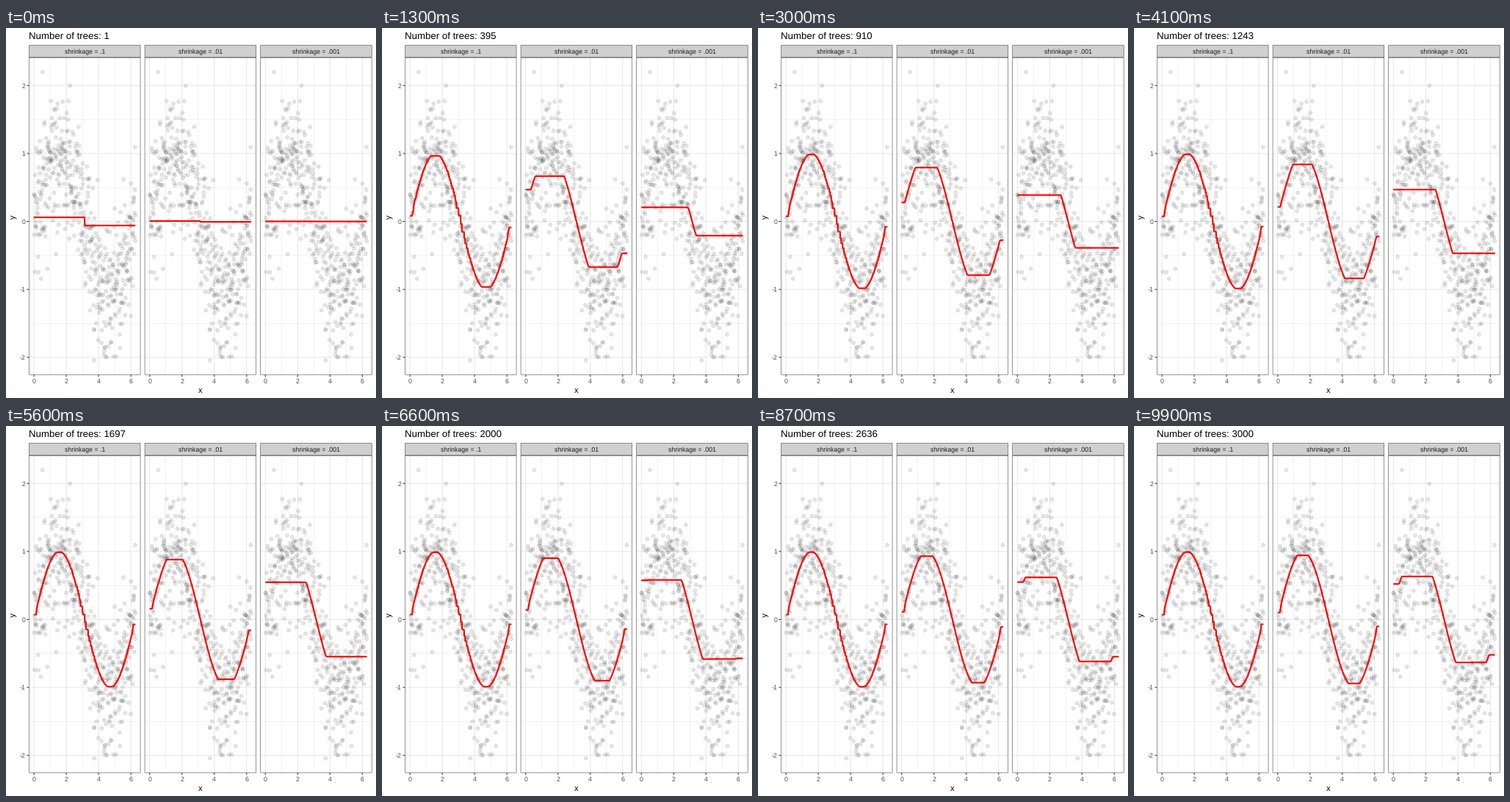
A matplotlib script that plays this animation: 504x504 px, repeating every 10000 ms.

```python
import math
import random

import matplotlib.pyplot as plt
import numpy as np
from matplotlib.animation import FuncAnimation
from matplotlib.patches import Rectangle

SIZE, DPI = 504, 72
FRAMES, INTERVAL = 100, 100
N, TREES, MIN_LEAF = 500, 3000, 10

LEFTS, WIDTH = (31.2, 188.8, 346.4), 152.1
STRIP_TOP, TOP, BOTTOM = 23.3, 40.2, 472.4
RATES = {".1": 0.1, ".01": 0.01, ".001": 0.001}

plt.rcParams["font.family"] = "Liberation Sans"
plt.rcParams["path.snap"] = False
plt.rcParams["text.hinting"] = "none"

GRID, DARK, LABEL, STRIP = "#e8e8e8", "#333333", "#4d4d4d", "#d0d0d0"
THIN, THICK = 0.53, 1.07


def to_px(left, x):
    return left + 6.9 + 22.0 * x


def to_py(y):
    return 263.5 - 92.55 * y


def seed_like_r(seed):
    """Seed the Mersenne Twister the way R's set.seed does."""
    key = []
    for i in range(675):
        seed = (69069 * seed + 1) % 2**32
        if i > 50:
            key.append(seed)
    random.setstate((3, tuple(key) + (624,), None))


def unif():
    return random.getrandbits(32) / 2**32


def normal_draws(count):
    """Normal deviates by inversion."""
    big = 2**27
    p = [(int(big * unif()) + unif()) / big for _ in range(count)]
    z = np.linspace(-5, 5, 20001)
    cdf = [0.5 * (1 + math.erf(v / math.sqrt(2))) for v in z]
    return np.interp(p, cdf, z)


def draw_bag():
    """Half of the indices, in order, without replacement."""
    bag, need = [], N // 2
    for i in range(N):
        if unif() * (N - i) < need:
            bag.append(i)
            need -= 1
            if not need:
                break
    return np.array(bag)


def boost(target, rate, counts):
    """Stochastic boosting with stumps; the fit after each tree count."""
    fit = np.zeros(N)
    half = N // 2
    cuts = np.arange(MIN_LEAF, half - MIN_LEAF + 1)
    wanted, fits = set(counts), {}
    for tree in range(1, TREES + 1):
        bag = draw_bag()
        sums = np.cumsum((target - fit)[bag])
        low = sums[cuts - 1]
        high = sums[-1] - low
        best = np.argmax((low / cuts - high / (half - cuts))**2
                         * cuts * (half - cuts))
        cut = cuts[best]
        edge = (bag[cut - 1] + bag[cut] + 1) // 2
        fit[:edge] += rate * low[best] / cut
        fit[edge:] += rate * high[best] / (half - cut)
        if tree in wanted:
            fits[tree] = fit.copy()
    return fits


seed_like_r(1112)
grid = np.linspace(0, 2 * math.pi, N)
truth = np.sin(grid)
noisy = truth + 0.5 * normal_draws(N)
counts = [round(1 + (TREES - 1) * k / (FRAMES - 1)) for k in range(FRAMES)]
fits = [boost(truth, rate, counts) for rate in RATES.values()]

fig = plt.figure(figsize=(SIZE / DPI, SIZE / DPI), dpi=DPI, facecolor="white")
ax = fig.add_axes([0, 0, 1, 1])
ax.set_xlim(0, SIZE)
ax.set_ylim(SIZE, 0)
ax.set_autoscale_on(False)
ax.axis("off")


def stroke(x0, y0, x1, y1, color, width, z):
    ax.plot([x0, x1], [y0, y1], color=color, lw=width, zorder=z,
            solid_capstyle="butt")


def box(left, top, bottom, fill, z):
    """Rectangle whose outline stays inside its edges."""
    ax.add_patch(Rectangle((left + THIN / 2, top + THIN / 2), WIDTH - THIN,
                           bottom - top - THIN, fc=fill, ec=DARK, lw=THIN,
                           zorder=z))


def panel(left, name):
    right = left + WIDTH
    for y in np.arange(-2, 2.1, 0.5):
        width = THICK if y == int(y) else THIN
        stroke(left, to_py(y), right, to_py(y), GRID, width, 1)
    for x in range(7):
        at = to_px(left, x)
        stroke(at, TOP, at, BOTTOM, GRID, THIN if x % 2 else THICK, 1)
        if x % 2 == 0:
            stroke(at, BOTTOM, at, BOTTOM + 2.75, DARK, THICK, 4)
            ax.text(at, 484, str(x), size=8.8, color=LABEL, ha="center")
    # One size per point keeps the circles at subpixel positions.
    ax.scatter(to_px(left, grid), to_py(noisy), s=np.full(N, 4.98**2),
               lw=0.71, fc=[(0, 0, 0, 0.1)], ec=[(0, 0, 0, 0.1)], zorder=2)
    box(left, STRIP_TOP, TOP, STRIP, 4)
    box(left, TOP, BOTTOM, "none", 5)
    ax.text(left + WIDTH / 2, 35, f"shrinkage = {name}", size=8.8,
            color="#1a1a1a", ha="center", zorder=6)
    line, = ax.plot([], [], color="red", lw=2.13, zorder=3,
                    solid_capstyle="butt", solid_joinstyle="round")
    return line


lines = [panel(left, name) for left, name in zip(LEFTS, RATES)]

for y in range(-2, 3):
    stroke(LEFTS[0] - 2.75, to_py(y), LEFTS[0], to_py(y), DARK, THICK, 4)
    ax.text(LEFTS[0] - 4.95, to_py(y) + 3.15, str(y), size=8.8, color=LABEL,
            ha="right")
ax.text(264.9, 497, "x", size=11, ha="center")
ax.text(13.6, 257, "y", size=11, ha="center", va="baseline",
        rotation=90, rotation_mode="anchor")
title = ax.text(LEFTS[0], 15, "", size=13.2)


def update(k):
    trees = counts[k]
    title.set_text(f"Number of trees: {trees}")
    for line, left, fit in zip(lines, LEFTS, fits):
        line.set_data(to_px(left, grid), to_py(fit[trees]))
    return [title, *lines]


anim = FuncAnimation(fig, update, frames=FRAMES, interval=INTERVAL,
                     repeat=True, repeat_delay=0, blit=False)
plt.show()
```
